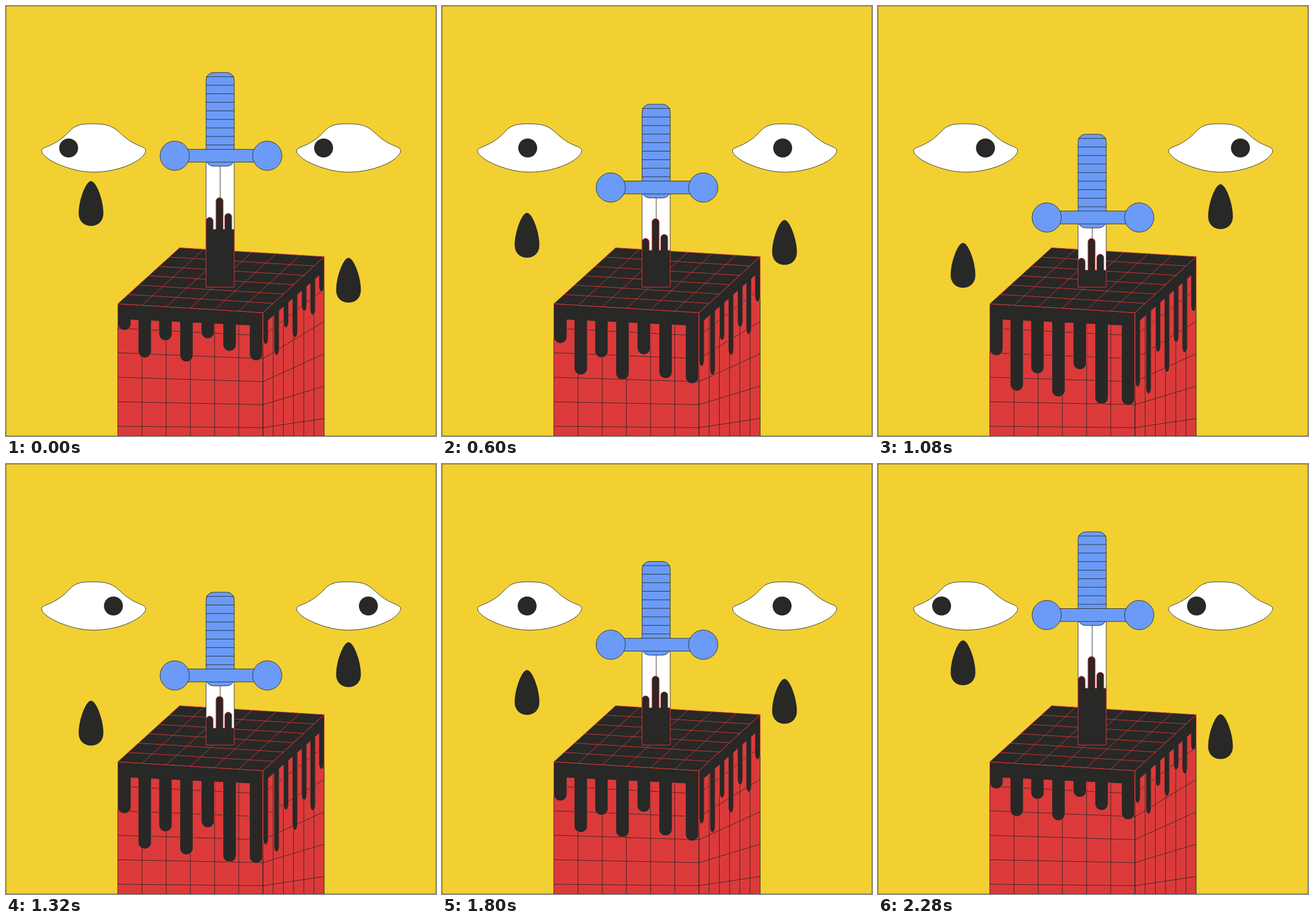
Animation of 748x748 px, one loop 2.4 s. Source, as an HTML page:

```html
<!DOCTYPE html>
<html lang="en">
<head>
<meta charset="utf-8">
<title>Sword</title>
<style>
html, body { margin: 0; width: 100%; height: 100%; overflow: hidden; background: #f2d031; }
svg { display: block; width: 100vw; height: 100vh; }
.ink { fill: #282826; }
.blood { fill: #282826; stroke: #dc3a3a; stroke-width: 1; }
.red { fill: #dc3a3a; stroke: #282826; }
.blue { fill: #6b9bf7; stroke: #282826; }
.white { fill: #fff; stroke: #282826; }
.line { fill: none; stroke: #282826; }
.redline { fill: none; stroke: #dc3a3a; }
svg * { stroke-width: .9; }
</style>
</head>
<body>
<svg viewBox="0 0 748 748">
  <defs>
    <path id="eye" class="white" d="M62 251C63 246 72 246 88 236.5C107 225 112 213 122 209C131 205 141 205 151 205C166 205 178 206 188 212.5C198 219 205 229 221 238C235 245 243 246 243 251.5C243 256 238 263 227 270C203 284 174 289 152 289C126 289 99 280 80 270C68 263 61 256 62 251Z"/>
    <path id="tear" class="ink" d="M0 0C9 0 21.5 33 21.5 56C21.5 70 12 78 0 78C-12 78 -21.5 70 -21.5 56C-21.5 33 -9 0 0 0Z"/>
  </defs>
  <rect width="748" height="748" fill="#f2d031"/>
  <use href="#eye"/>
  <use href="#eye" x="443.5"/>
  <g id="pupils" class="ink"><circle cx="109" cy="247" r="16.5"/><circle cx="552.5" cy="247" r="16.5"/></g>
  <use id="tearL" href="#tear"/>
  <use id="tearR" href="#tear"/>

  <path class="red" d="M194.5 518L447 533.5V760H194.5ZM447 533.5L553.5 436V760H447Z"/>
  <path id="sideGrid" class="line"/>
  <path id="frontDrips" class="blood"/>
  <path id="rightDrips" class="blood"/>
  <path class="blood" d="M194.5 518L447 533.5L553.5 436L302 420.5Z"/>
  <path id="topGrid" class="redline"/>

  <path id="blade" class="white"/>
  <path id="ridge" class="line"/>
  <path id="bladeBlood" class="blood"/>
  <g id="hilt">
    <rect class="blue" x="348" y="115.7" width="49" height="163" rx="13"/>
    <path id="grip" class="line"/>
    <rect class="blue" x="300" y="249.3" width="148" height="22.4"/>
    <circle class="blue" cx="293.5" cy="260.5" r="25.5"/>
    <circle class="blue" cx="454.5" cy="260.5" r="25.5"/>
  </g>
  <rect class="line" width="748" height="748"/>
</svg>
<script>
const LOOP = 2400, STEP = 120, FALL = 1200, RISE = 1180;
const $ = id => document.getElementById(id);
const setPath = (id, d) => $(id).setAttribute('d', d);
const move = (id, x, y) => $(id).setAttribute('transform', `translate(${x} ${y})`);
const mix = (a, b, u) => a + (b - a) * u;
const range = (n, fn) => Array.from({ length: n }, (_, i) => fn(i));
const smooth = u => u * u * (3 - 2 * u);

// Each drip: left edge, resting tip, travel
const FRONT = [[194.5, 564, 45.3], [230, 612, 59.3], [266, 582, 59.2], [302.5, 619, 62.5],
  [339.7, 578.5, 55.5], [377.5, 600.5, 94.8], [423.7, 617, 79.7]];
const RIGHT = [[447, 588.5, 76], [466, 607.5, 69], [482.5, 559.5, 43.5], [498, 576.5, 62],
  [514, 531, 55.5], [529, 537.5, 67.5], [544.2, 497, 35]];

function drips(list, width, ry, hem, top, p) {
  const r = width / 2;
  const parts = list.map(([x, tip, travel]) => {
    const end = tip + travel * p - ry;
    return `L${x} ${hem(x)}V${end}A${r} ${ry} 0 0 0 ${x + width} ${end}V${hem(x + width)}`;
  });
  return top + parts.join('') + 'Z';
}

function drawGrids() {
  const A = [194.5, 518], B = [447, 533.5], C = [553.5, 436], D = [302, 420.5];
  const seg = (p, q) => `M${p}L${q}`;
  const along = (p, q, u) => [mix(p[0], q[0], u), mix(p[1], q[1], u)];
  setPath('topGrid', range(5, i => {
    const u = (i + 1) / 6;
    return seg(along(A, B, u), along(D, C, u)) + seg(along(A, D, u), along(B, C, u));
  }).join(''));
  setPath('sideGrid', range(5, i => {
    const k = i + 1, front = along(A, B, k / 6), right = along(B, C, k / 6);
    return `M${front}V760M${right}V760` +
      `M${A[0]} ${A[1] + 42.6 * k}L${B[0]} ${B[1] + 40 * k}L${C[0]} ${C[1] + 56.3 * k}`;
  }).join(''));
  setPath('grip', range(9, k => `M348 ${123 + 14.85 * k}h49`).join(''));
}

function drawSword(p) {
  const drop = 110.5 * p, level = 73 * p;
  const finger = (x, top, w) =>
    `H${x}V${top + level + w / 2}a${w / 2} ${w / 2} 0 0 1 ${w} 0V${388.5 + level}`;
  move('hilt', 0, drop);
  setPath('blade', `M348 ${265 + drop}H397V489H348Z`);
  setPath('ridge', `M372.6 ${278 + drop}V${340 + level}`);
  setPath('bladeBlood', `M348 489${finger(348, 367.6, 12.3)}${finger(365.2, 333.3, 12.6)}` +
    `${finger(380.5, 360.7, 12.3)}H397V489Z`);
}

function render(time) {
  const t = Math.floor((time % LOOP) / STEP) * STEP;
  const p = t <= FALL ? smooth(t / FALL) : 1 - smooth(Math.min(1, (t - FALL) / RISE));
  move('pupils', 80.2 * p, 0);
  move('tearL', 147.9, 304.5 + 110.5 * p);
  move('tearR', 595.8, 438 - 131.7 * p);
  setPath('frontDrips', drips(FRONT, 22.8, 11.4, x => 546 + (x - 217) * .048,
    'M447 533.5L194.5 518', p));
  setPath('rightDrips', drips(RIGHT, 9.2, 11, x => 547 - (x - 456) * .88,
    'M553.5 436L447 533.5', p));
  drawSword(p);
}

drawGrids();
const start = performance.now();
function tick() {
  render(performance.now() - start);
  requestAnimationFrame(tick);
}
tick();
</script>
</body>
</html>
```
